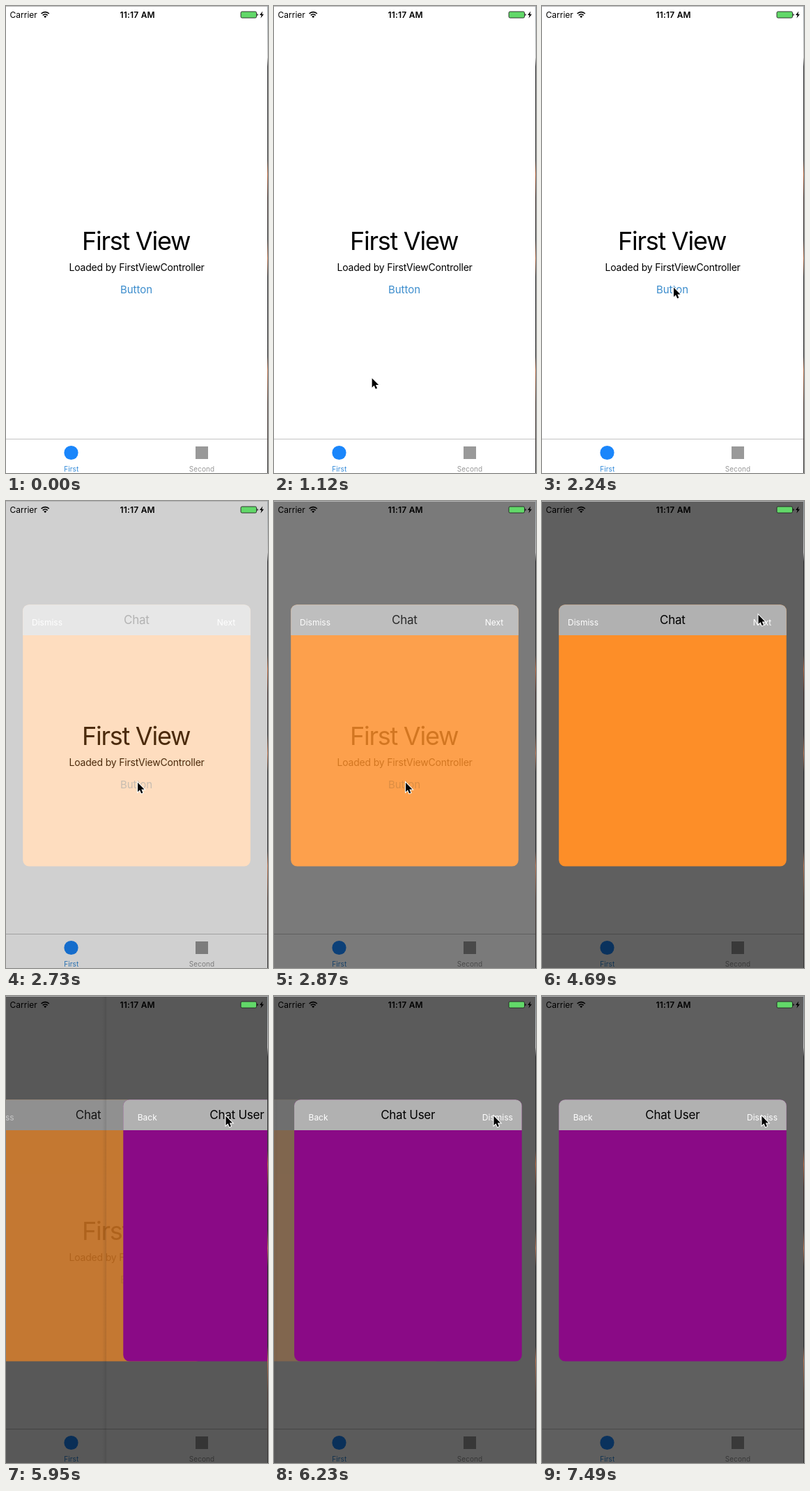
Write an HTML page that moves like this. It is 376x668 px and loops after 8 s.

```html
<!DOCTYPE html>
<html lang="en">
<head>
<meta charset="utf-8">
<title>Modal card navigation</title>
<style>
  html, body { margin: 0; width: 100%; height: 100%; overflow: hidden; background: #fff; }
  svg { display: block; width: 376px; height: 668px; }
  text { font-family: Inter, Roboto, "Liberation Sans", sans-serif; font-size: 12px; fill: #000; }
  .mid { text-anchor: middle; }
  .headline { font-size: 36px; letter-spacing: -1.25px; }
  .detail { font-size: 14px; letter-spacing: -.2px; }
  .button { font-size: 15px; fill: #3c8dcd; }
  .tab { font-size: 10px; letter-spacing: .1px; }
  .title { font-size: 17px; letter-spacing: -.25px; }
  .action { fill: #fff; }
  .time { font-weight: 600; letter-spacing: .2px; }
</style>
</head>
<body>
<svg viewBox="0 0 376 668">
  <defs>
    <path id="header" d="M24.2 192V157.2a9 9 0 0 1 9-9H341.8a9 9 0 0 1 9 9V192z" fill="#b1b1b1"/>
    <linearGradient id="edgeFill" x2="0" y2="1">
      <stop offset="0" stop-color="#9aa3a8"/>
      <stop offset=".11" stop-color="#c4c4c4"/>
      <stop offset=".13" stop-color="#2a2a2c"/>
      <stop offset=".33" stop-color="#333"/>
      <stop offset=".36" stop-color="#b5623a"/>
      <stop offset=".41" stop-color="#3a2a28"/>
      <stop offset=".5" stop-color="#2a2a2c"/>
      <stop offset=".54" stop-color="#b8704c"/>
      <stop offset=".58" stop-color="#262628"/>
      <stop offset=".75" stop-color="#2a2a2c"/>
      <stop offset=".78" stop-color="#b8704c"/>
      <stop offset=".85" stop-color="#4a3a34"/>
      <stop offset="1" stop-color="#333"/>
    </linearGradient>
    <linearGradient id="shadowFill">
      <stop offset="0" stop-color="#000" stop-opacity="0"/>
      <stop offset="1" stop-color="#000" stop-opacity=".13"/>
    </linearGradient>
  </defs>

  <rect width="376" height="668" fill="#fff"/>
  <text class="mid headline" x="186.6" y="349">First View</text>
  <text class="mid detail" x="187.6" y="379">Loaded by FirstViewController</text>
  <text class="mid button" id="button" x="187" y="411">Button</text>
  <path d="M0 619.5H375" stroke="#c4c4c4"/>
  <circle cx="93.5" cy="639" r="10.1" fill="#1a86fb"/>
  <text class="mid tab" x="93.7" y="666" style="fill:#2f88d8">First</text>
  <rect x="272" y="630" width="18" height="18" fill="#999"/>
  <text class="mid tab" x="281" y="666" style="fill:#999">Second</text>

  <g id="modal">
    <rect width="376" height="668" fill-opacity=".627"/>
    <g id="chat">
      <rect x="24.2" y="148.2" width="326.6" height="374.4" rx="9" fill="#fd8e28"/>
      <use href="#header"/>
      <text class="mid title" x="187.3" y="176">Chat</text>
      <text class="mid action" x="59" y="178">Dismiss</text>
      <text class="mid action" x="316" y="178">Next</text>
    </g>
    <rect id="shade" width="376" height="668"/>
    <g id="user">
      <rect id="shadow" x="-6" width="6" height="668" fill="url(#shadowFill)"/>
      <rect x="24.2" y="148.2" width="326.6" height="374.4" rx="9" fill="#8a0a86"/>
      <use href="#header"/>
      <text class="mid title" x="187.3" y="176">Chat User</text>
      <text class="mid action" x="58.7" y="178">Back</text>
      <text class="mid action" x="316" y="178">Dismiss</text>
    </g>
  </g>

  <text x="5.6" y="17">Carrier</text>
  <g fill="none" stroke="#000" stroke-width="1.7">
    <path d="M50.6 11a8 8 0 0 1 11.2 0M52.8 13.3a4.9 4.9 0 0 1 6.8 0"/>
    <path d="M56.2 17l-2-2.1a2.9 2.9 0 0 1 4 0z" fill="#000" stroke="none"/>
  </g>
  <text class="mid time" x="188.7" y="17">11:17 AM</text>
  <rect x="337" y="8" width="22.5" height="9" rx="1.8" fill="#62d869" stroke="#222" stroke-width=".9"/>
  <path d="M360.5 10.8a1.8 1.8 0 0 1 0 3.4z"/>
  <path d="M368.3 7.6l-4.3 5.4h2.6l-1.2 4.4 4.6-5.6h-2.7z"/>

  <rect width="376" height="1" fill="#b5b5b5"/>
  <rect x="375" width="1" height="668" fill="url(#edgeFill)"/>
  <path id="cursor" d="M.5 .8V14l3-2.8 2.2 5 2.2-1-2.1-4.8h4.2z" stroke="#fff" stroke-width="2" paint-order="stroke"/>
</svg>

<script>
  const LOOP = 8000, PRESS = 2590, RELEASE = 2840, PRESENT = 2660, PUSH = 5814, FADE = 550, WIDTH = 375;
  const part = Object.fromEntries(
    ["button", "modal", "chat", "shade", "user", "shadow", "cursor"].map(id => [id, document.getElementById(id)]));

  // Pointer stops: time, x, y
  const path = [
    [910, 61, 646], [1120, 140, 532], [1330, 169, 462], [1680, 188.5, 402],
    [3710, 188.5, 402], [3920, 217, 346], [4200, 279, 225], [4480, 310, 163],
    [4690, 310, 162], [4970, 315, 171]
  ];

  const clamp = v => Math.min(1, Math.max(0, v));

  // Critically damped spring from 0 to 1
  function spring(ms) {
    const x = Math.max(0, ms) * 0.0152;
    return 1 - (1 + x) * Math.exp(-x);
  }

  function pointerAt(t) {
    const i = path.findIndex(stop => stop[0] > t);
    if (i < 0) return path[path.length - 1].slice(1);
    const [t0, x0, y0] = path[i - 1], [t1, x1, y1] = path[i];
    const k = (t - t0) / (t1 - t0);
    return [x0 + (x1 - x0) * k, y0 + (y1 - y0) * k];
  }

  const show = (el, opacity) => {
    el.style.display = opacity > 0 ? "" : "none";
    el.style.opacity = opacity;
  };
  const move = (el, x, y = 0) => el.setAttribute("transform", `translate(${x} ${y})`);

  function draw(t) {
    const push = spring(t - PUSH), fade = clamp((t - PUSH) / FADE);
    part.button.style.opacity = t >= PRESS && t < RELEASE ? 0.4 : 1;
    show(part.modal, spring(t - PRESENT));
    show(part.chat, 1 - fade);
    move(part.chat, -0.3 * WIDTH * push);
    show(part.shade, 0.08 * clamp(fade * 4) * (1 - clamp(fade * 2 - 1)));
    show(part.user, t > PUSH ? 1 : 0);
    move(part.user, WIDTH * (1 - push));
    show(part.shadow, 1 - fade);
    show(part.cursor, t >= path[0][0] ? 1 : 0);
    if (t >= path[0][0]) move(part.cursor, ...pointerAt(t));
  }

  const start = performance.now();
  function tick() {
    draw((performance.now() - start) % LOOP);
    requestAnimationFrame(tick);
  }
  tick();
</script>
</body>
</html>
```
